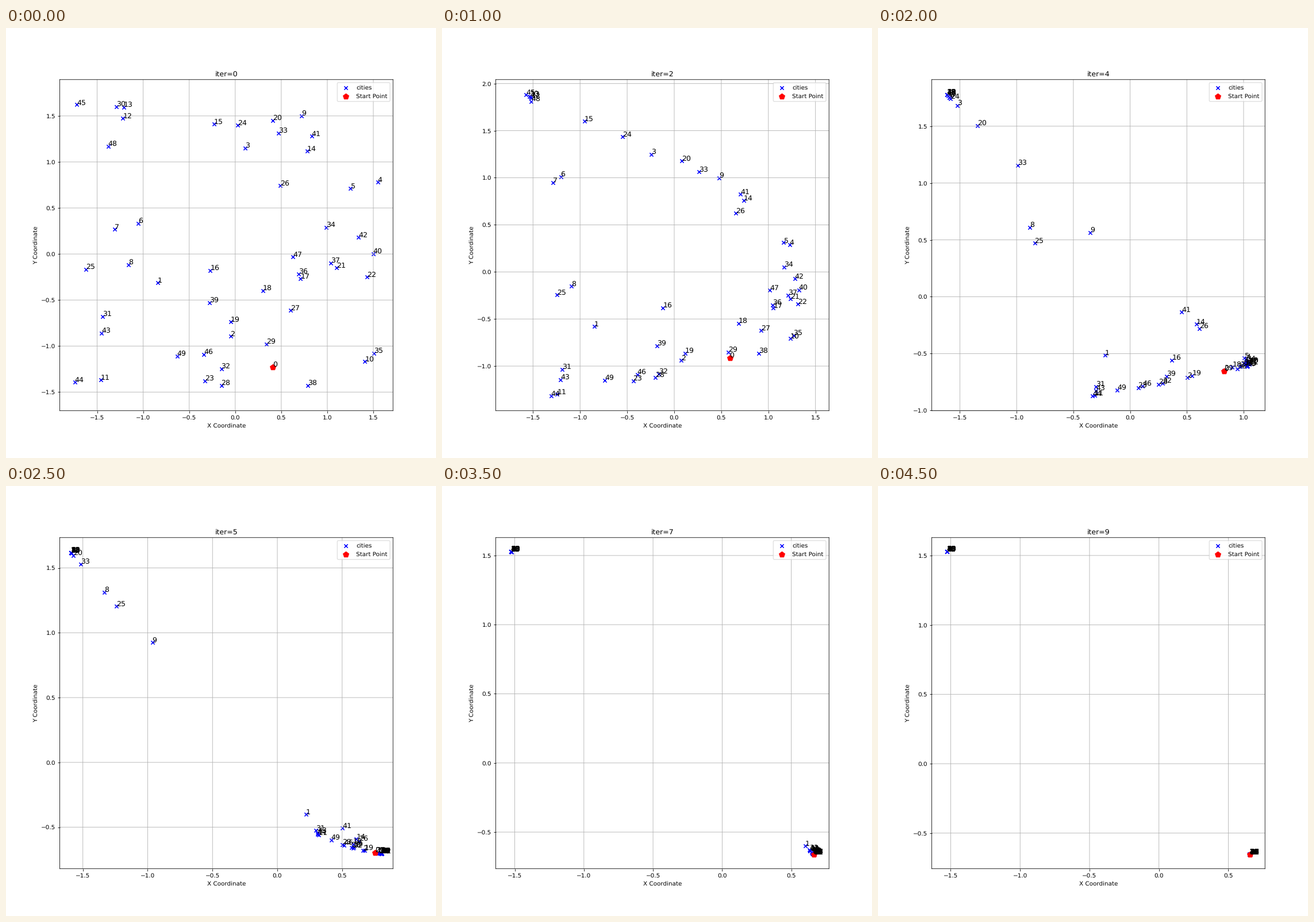
These frames come from a looping animation (748x748 px, 5000 ms). A matplotlib script:

```python
import numpy as np
import matplotlib.pyplot as plt
from matplotlib.animation import FuncAnimation

STEPS = 10

# Unsnapped lines and unhinted glyphs give soft, sub-pixel edges.
plt.rcParams.update({"path.snap": False, "text.hinting": "none"})

# Starting layout, one (x, y) per city; every later layout is computed.
CITIES = [
    (0.41, -1.23), (-0.84, -0.31), (-0.05, -0.89), (0.11, 1.15), (1.55, 0.78),
    (1.25, 0.71), (-1.05, 0.33), (-1.31, 0.27), (-1.16, -0.12), (0.72, 1.50),
    (1.41, -1.17), (-1.46, -1.37), (-1.22, 1.47), (-1.21, 1.59), (0.78, 1.12),
    (-0.23, 1.41), (-0.27, -0.18), (0.71, -0.27), (0.30, -0.40), (-0.05, -0.74),
    (0.41, 1.45), (1.10, -0.15), (1.43, -0.25), (-0.33, -1.38), (0.03, 1.40),
    (-1.62, -0.17), (0.49, 0.74), (0.60, -0.61), (-0.15, -1.43), (0.34, -0.98),
    (-1.29, 1.60), (-1.44, -0.68), (-0.15, -1.25), (0.47, 1.31), (0.99, 0.29),
    (1.51, -1.08), (0.69, -0.22), (1.04, -0.10), (0.79, -1.43), (-0.28, -0.53),
    (1.50, 0.00), (0.83, 1.28), (1.34, 0.18), (-1.45, -0.86), (-1.74, -1.39),
    (-1.72, 1.62), (-0.34, -1.09), (0.63, -0.03), (-1.38, 1.17), (-0.63, -1.11),
]


def standardize(p):
    return (p - p.mean(axis=0)) / p.std(axis=0)


def attend(p):
    """One round of dot-product self-attention over the points."""
    w = np.exp(p @ p.T)
    return w @ p / w.sum(axis=1, keepdims=True)


states = [standardize(np.array(CITIES))]
for _ in range(STEPS - 1):
    states.append(standardize(attend(states[-1])))

fig, ax = plt.subplots(figsize=(10, 10), dpi=74.8)


def update(i):
    pts = states[i]
    ax.clear()
    ax.scatter(*pts.T, color="blue", marker="x", label="cities")
    ax.scatter(*pts[0], color="red", marker="p", s=100, label="Start Point")
    for k, (x, y) in enumerate(pts):
        ax.text(x, y, str(k), fontsize=12)
    ax.set(title=f"iter={i}", xlabel="X Coordinate", ylabel="Y Coordinate")
    ax.legend(loc="upper right")
    ax.grid(True)
    ax.axis("equal")
    return []


anim = FuncAnimation(fig, update, frames=STEPS, interval=500, repeat=True)
plt.show()
```
